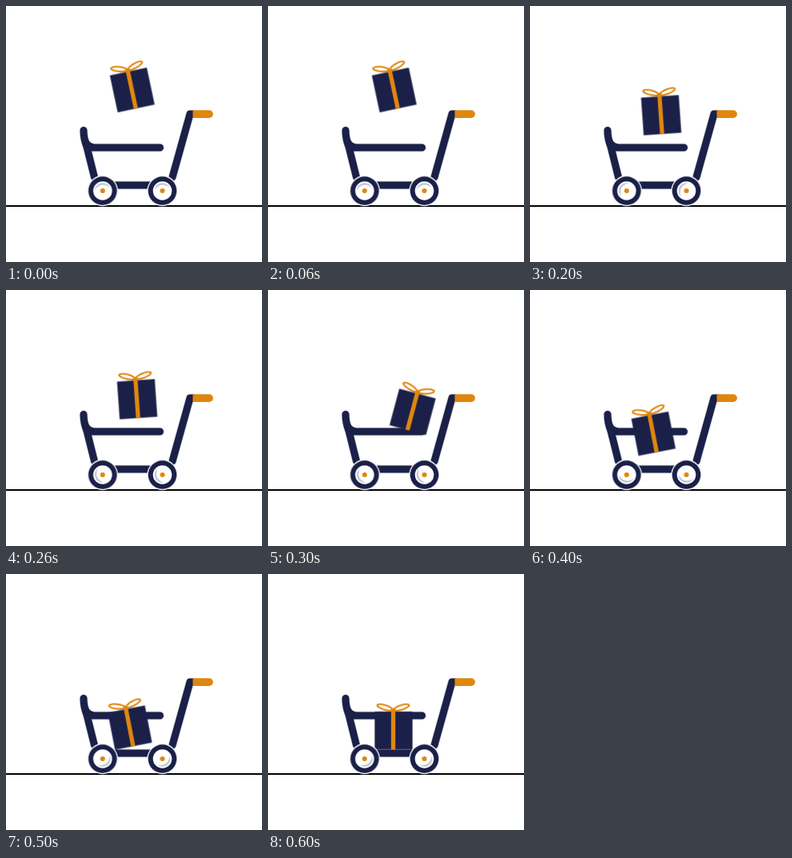
Recreate the animation shown at these times as an HTML page. Size 320 px wide and 320 px high, loop 700 ms.

```html
<!DOCTYPE html>
<html lang="en">
<head>
<meta charset="utf-8">
<title>Gift dropping into a cart</title>
<style>
  html, body { margin: 0; width: 100%; height: 100%; overflow: hidden; background: #fff; }
  svg { display: block; width: 100vw; height: 100vh; }

  .bars { fill: none; stroke-linecap: round; stroke-linejoin: round; }
  .edge { stroke: #d3d5de; stroke-width: 10.6; }
  .core { stroke: #1b2048; stroke-width: 9; }
  .navy { fill: #1b2048; }
  .orange { fill: #e0860f; }
  .loop { fill: none; stroke: #e0860f; stroke-width: 2.1; }

  .gift { animation: drop 700ms step-end infinite; }
  .shine { fill: #b9bdc8; animation: spin 700ms steps(7) infinite; }

  /* The gift falls, bounces off the rail and the handle, then settles. */
  @keyframes drop {
    0%      { transform: translate(157.8px, 105px) rotate(-12deg); }
    14.286% { transform: translate(157.8px, 125.3px) rotate(-12deg); }
    28.571% { transform: translate(164px, 136.5px) rotate(-4deg); }
    42.857% { transform: translate(180.8px, 152.3px) rotate(15deg); }
    57.143% { transform: translate(154.3px, 179.6px) rotate(-11deg); }
    71.429% { transform: translate(154.9px, 192px) rotate(-11deg); }
    85.714%, 100% { transform: translate(157px, 195.7px) rotate(0deg); }
  }
  @keyframes spin {
    from { transform: rotate(-10deg); }
    to { transform: rotate(-370deg); }
  }
</style>
</head>
<body>
<svg viewBox="0 0 320 320">
  <defs>
    <path id="frame" d="M97 155.5Q97 166 101 176L110.5 214M102 177H192.5M130 224H186M234 135H230L208 214"/>
    <g id="wheel">
      <circle r="19.2" fill="#fff"/>
      <circle r="18.5" fill="#c9cbd6"/>
      <circle r="17.7" class="navy"/>
      <circle r="11.8" fill="#fff"/>
      <path class="shine" d="M-9.4 -2.5A9.7 9.7 0 0 1 9.4 -2.5A11.5 11.5 0 0 0 -9.4 -2.5Z"/>
      <circle r="3" class="orange"/>
    </g>
  </defs>

  <path d="M0 250H320" stroke="#000" stroke-width="1.8"/>

  <!-- cart -->
  <use href="#frame" class="bars edge"/>
  <use href="#frame" class="bars core"/>
  <path class="navy" d="M101.3 160Q102.5 171.5 110 172.5L104 178Z"/>
  <path class="orange" d="M233.5 130.2H254a4.9 4.9 0 0 1 0 9.8H233.5Z"/>

  <g class="gift">
    <rect class="navy" x="-23.6" y="-23.6" width="47.2" height="47.2"/>
    <rect class="orange" x="-3.1" y="-25" width="5.3" height="48.6"/>
    <ellipse class="loop" rx="9.8" ry="2.9" transform="translate(-11 -29) rotate(17)"/>
    <ellipse class="loop" rx="9.8" ry="2.9" transform="translate(10 -29) rotate(-17)"/>
    <circle class="orange" cx="-.5" cy="-25.6" r="2.7"/>
  </g>

  <use href="#wheel" x="120.8" y="231"/>
  <use href="#wheel" x="195.5" y="231"/>
</svg>
</body>
</html>
```
